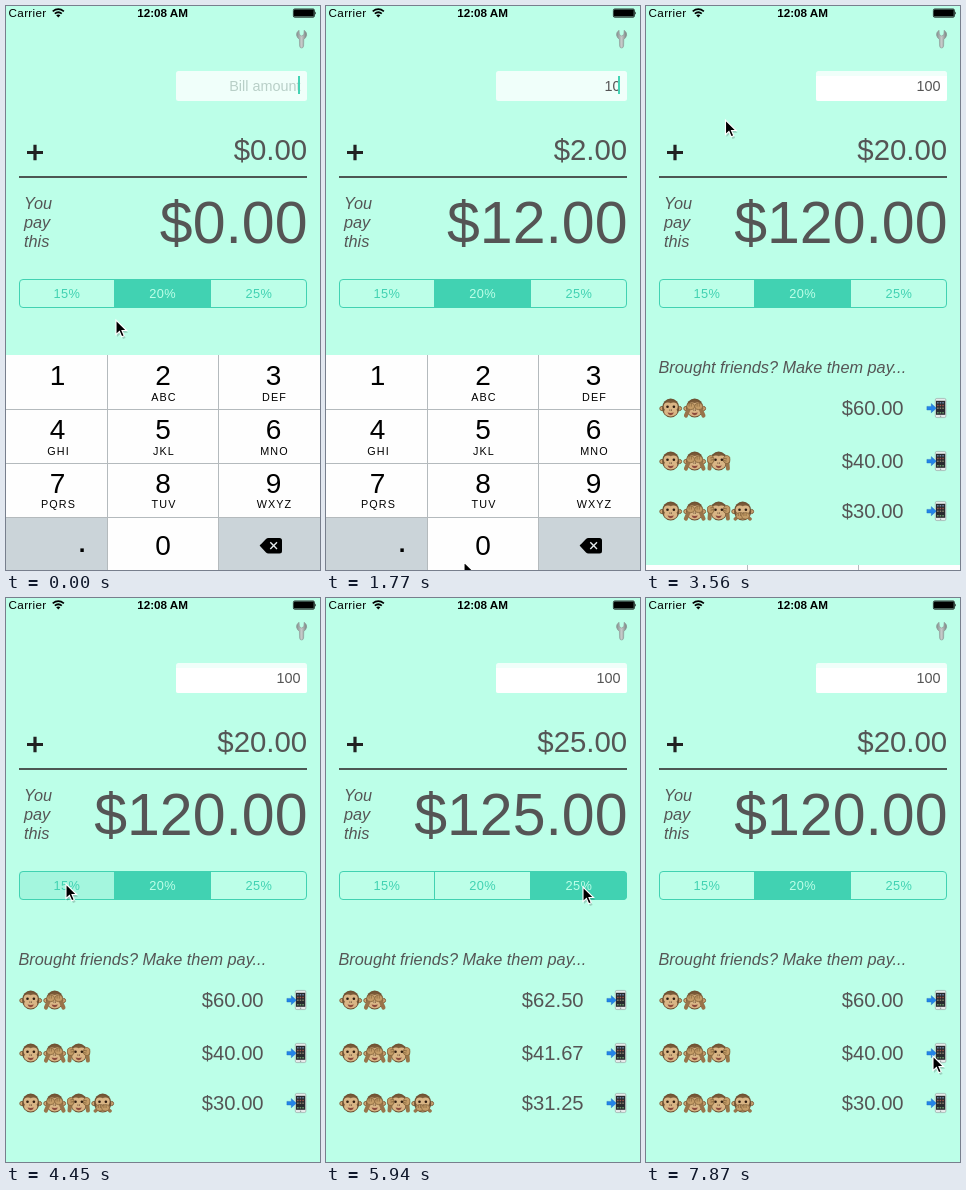
Animation, 314 px wide and 564 px high, one loop 8000 ms. Source, as an HTML page:

```html
<!DOCTYPE html>
<html lang="en">
<head>
<meta charset="utf-8">
<title>Tip calculator</title>
<style>
  html, body { margin: 0; width: 100%; height: 100%; overflow: hidden; background: #bcffe8; }
  svg { display: block; width: 314px; height: 564px; font-family: "Liberation Sans", Arial, sans-serif; }
  .grey { fill: #555; }
  .end { text-anchor: end; font-kerning: none; }
  .mid { text-anchor: middle; }
  .note { font-size: 16.3px; font-style: italic; fill: #555; }
</style>
</head>
<body>
<svg id="stage" viewBox="0 0 314 564">
  <defs>
    <linearGradient id="steel">
      <stop offset="0" stop-color="#84908e"/>
      <stop offset=".5" stop-color="#c6cac9"/>
      <stop offset="1" stop-color="#768280"/>
    </linearGradient>
    <radialGradient id="fur">
      <stop offset="0" stop-color="#a07b4e"/>
      <stop offset="1" stop-color="#6b4e30"/>
    </radialGradient>
    <g id="head">
      <g fill="#cfa673" stroke="#80623c" stroke-width="1">
        <circle cx="-8.8" cy=".5" r="2.1"/><circle cx="8.8" cy=".5" r="2.1"/>
      </g>
      <ellipse rx="8.6" ry="9.4" fill="url(#fur)"/>
      <g fill="#d9b585">
        <circle cx="-2.9" cy="-1.4" r="4.1"/><circle cx="2.9" cy="-1.4" r="4.1"/>
        <ellipse cy="3.8" rx="6.6" ry="4.7"/>
      </g>
      <g fill="#2e1c10">
        <circle cx="-3.2" cy="-1.2" r="1.3"/><circle cx="3.2" cy="-1.2" r="1.3"/>
        <circle cx="-.8" cy="2" r=".5"/><circle cx=".8" cy="2" r=".5"/>
      </g>
      <path d="M-3.2 4.6Q0 5.4 3.2 4.6Q2.3 7.2 0 7.2Q-2.3 7.2-3.2 4.6z" fill="#8c4a3c"/>
    </g>
    <g id="hand" stroke="#80603a" stroke-width=".7">
      <ellipse rx="4" ry="3.3" fill="#c39c67"/>
      <path d="M-1.6-2.7V.2M.6-3V.2" fill="none"/>
    </g>
    <g id="monkey0"><use href="#head"/></g>
    <g id="monkey1">
      <use href="#head"/>
      <path d="M-8.8 7.6L-6 1M8.8 7.6L6 1" stroke="#98744a" stroke-width="4" stroke-linecap="round"/>
      <use href="#hand" x="-4" y="-1.6"/><use href="#hand" x="4" y="-1.6"/>
    </g>
    <g id="monkey2">
      <use href="#head"/>
      <path d="M-9.2 7.6L-8.6 0M9.2 7.6L8.6 0" stroke="#98744a" stroke-width="4" stroke-linecap="round"/>
      <use href="#hand" transform="translate(-8 -1.5) rotate(80)"/>
      <use href="#hand" transform="translate(8 -1.5) rotate(-80)"/>
    </g>
    <g id="monkey3">
      <use href="#head"/>
      <path d="M-7.4 8L-4 5M7.4 8L4 5" stroke="#98744a" stroke-width="3.4" stroke-linecap="round"/>
      <use href="#hand" x="-2.8" y="4.8"/><use href="#hand" x="2.8" y="4.8"/>
    </g>
    <g id="send">
      <rect x="-1.2" y="-9.6" width="10.6" height="19.2" rx="1.5" fill="#e6ebeb" stroke="#929d9d" stroke-width=".6"/>
      <rect x="-.5" y="-7.2" width="9.2" height="14" fill="#282a2e"/>
      <g stroke-width="1.5" stroke-dasharray="1.5 1.1">
        <path d="M.6-5.2H8" stroke="#6b82a5"/><path d="M.6-2.5H8" stroke="#a3574d"/>
        <path d="M.6.2H8" stroke="#85806b"/><path d="M.6 4.8H8" stroke="#6a9a6c"/>
      </g>
      <circle cx="4.1" cy="8.2" r=".7" fill="#929d9d"/>
      <path d="M-9.6-1.6H-5.2V-4.4L-.2.2L-5.2 4.8V2H-9.6z" fill="#2384e8" stroke="#1767bd" stroke-width=".4"/>
    </g>
    <clipPath id="pill"><rect x="13" y="273" width="288" height="29" rx="4"/></clipPath>
  </defs>

  <rect width="314" height="564" fill="#bcffe8"/>

  <text x="2.6" y="11.2" font-size="11.7" letter-spacing=".3">Carrier</text>
  <g fill="none" stroke="#000" stroke-width="1.7">
    <path d="M46.7 5.4Q52.3.9 57.9 5.4M48.8 7.7Q52.3 4.8 55.8 7.7"/>
  </g>
  <path d="M50.2 9.3Q52.3 7.6 54.4 9.3L52.3 11.6z"/>
  <text class="mid" x="156.6" y="11.2" font-size="11.7" font-weight="bold">12:08 AM</text>
  <rect x="287.4" y="3" width="21" height="8.2" rx="1.3" fill="none" stroke="#000" stroke-width=".8"/>
  <rect x="288" y="3.6" width="19.8" height="7" rx=".6"/>
  <path d="M309 5.5Q310.7 7.1 309 8.7z"/>

  <path d="M293 24.2Q290 26.4 290.6 29.6Q291.2 32 293.4 33.2L293.6 40Q293.8 42 295.6 42Q297.4 42 297.6 40L297.8 33.2Q300 32 300.6 29.6Q301.2 26.4 298.2 24.2L297.8 28.6L295.6 30L293.4 28.6z" fill="url(#steel)" stroke="#7f8b89" stroke-width=".5"/>

  <rect x="170" y="65" width="131" height="30" rx="2.5" fill="#fff" opacity=".78"/>
  <path id="field" d="M170 70H301V92.5Q301 95 298.5 95H172.5Q170 95 170 92.5z" fill="#fff"/>
  <text id="bill" class="end" x="294.4" y="84.5" font-size="14.4"></text>
  <rect id="caret" x="292" y="70" width="2" height="18" fill="#44d3b4"/>

  <path d="M21 146.5H37M29 138.7V154.3" stroke="#222" stroke-width="3.2"/>
  <text id="tip" class="grey end" x="301.2" y="154" font-size="29.4"></text>
  <rect x="13" y="170" width="288" height="2" fill="#4c5753"/>
  <g class="note"><text x="18" y="203">You</text><text x="18" y="222">pay</text><text x="18" y="241">this</text></g>
  <text id="total" class="grey end" x="301.5" y="237.3" font-size="59"></text>

  <g id="segs" font-size="12.8" letter-spacing=".5"></g>
  <path d="M108.5 273V302M204.5 273V302" stroke="#41d2b2"/>
  <rect x="13.5" y="273.5" width="287" height="28" rx="3.5" fill="none" stroke="#41d2b2"/>

  <text class="note" x="12.5" y="367">Brought friends? Make them pay...</text>
  <g id="friends"></g>
  <g id="keys"></g>

  <g id="cursor">
    <path d="M1 2V17L4.6 13.8L7 19L9.6 17.9L7.2 12.8H12z" fill="#000" opacity=".18"/>
    <path d="M0 0V14.6L3.4 11.5L5.7 16.8L8.3 15.7L6 10.5H10.6z" stroke="#fff" stroke-width="1.1"/>
  </g>
</svg>
<script>
const LOOP = 8000, STEP = 148.4;
const RATES = [15, 20, 25];
const TINT = '#41d2b2', MINT = '#bcffe8';
const $ = id => document.getElementById(id);

function add(parent, tag, attrs, text) {
  const el = document.createElementNS('http://www.w3.org/2000/svg', tag);
  for (const name in attrs) el.setAttribute(name, attrs[name]);
  if (text) el.textContent = text;
  return parent.appendChild(el);
}

// Segmented control
const edges = [13, 108.5, 204.5, 301];
const segs = RATES.map((rate, i) => {
  const x = edges[i], width = edges[i + 1] - x;
  return {
    box: add($('segs'), 'rect', { x, y: 273, width, height: 29, fill: TINT, 'clip-path': 'url(#pill)' }),
    label: add($('segs'), 'text', { class: 'mid', x: x + width / 2 + .2, y: 292 }, rate + '%')
  };
});

// Split rows
const shares = [402, 455, 505].map((y, row) => {
  for (let i = 0; i < row + 2; i++) add($('friends'), 'use', { href: '#monkey' + i, x: 24.7 + 24 * i, y });
  add($('friends'), 'use', { href: '#send', x: 290.5, y });
  return add($('friends'), 'text', { class: 'grey end', x: 257.6, y: y + 7, 'font-size': 20.2 });
});

// Number pad
const cols = [0, 101.5, 212.5, 314], rows = [349, 403.5, 457.5, 511.5, 564];
const centers = [51.5, 157, 267.5];
const letters = ['', 'ABC', 'DEF', 'GHI', 'JKL', 'MNO', 'PQRS', 'TUV', 'WXYZ'];
const WHITE = '#fefefe', GREY = '#cbd4d9';
const pad = $('keys'), keyBoxes = {};
for (let i = 0; i < 12; i++) {
  const c = i % 3, r = Math.floor(i / 3);
  const name = i < 9 ? i + 1 : ['dot', 0, 'del'][c];
  keyBoxes[name] = add(pad, 'rect', {
    x: cols[c], y: rows[r], width: cols[c + 1] - cols[c], height: rows[r + 1] - rows[r],
    fill: typeof name === 'number' ? WHITE : GREY
  });
  if (typeof name === 'number')
    add(pad, 'text', { class: 'mid', x: centers[c], y: r < 3 ? 379 + 54 * r : 549, 'font-size': 28 }, String(name));
  if (letters[i])
    add(pad, 'text', { class: 'mid', x: centers[c] + 1, y: 395 + 53.7 * r, 'font-size': 10.8, 'letter-spacing': 1.1 }, letters[i]);
}
add(pad, 'path', { d: 'M101.5 349V564M212.5 349V564M0 403.5H314M0 457.5H314M0 511.5H314', stroke: '#b4babd', 'stroke-width': 1 });
add(pad, 'text', { class: 'mid', x: 76, y: 546, 'font-size': 24, 'font-weight': 'bold' }, '.');
add(pad, 'path', { d: 'M253.6 539.6L260 533Q261 532 262.4 532H273.5Q276 532 276 534.5V545Q276 547.5 273.5 547.5H262.4Q261 547.5 260 546.4z' });
add(pad, 'path', { d: 'M264.3 536.2L271 543M271 536.2L264.3 543', stroke: '#e4e9ec', 'stroke-width': 1.4 });

// Pointer path: tick, x, y
const path = [
  [0, 110, 314], [1, 107, 319], [4, 55, 371], [6, 54, 374], [7, 84, 442], [8, 130, 529], [10, 138, 556],
  [17, 138, 556], [18, 96, 270], [19, 79.5, 114], [24, 79.5, 114], [25, 78, 132], [28, 63, 272],
  [30, 60, 286], [32, 64, 287], [34, 157, 287], [36, 254, 288], [38, 259, 289], [41, 256, 289],
  [44, 192, 290], [46, 171.5, 290], [48, 178, 296], [51, 278, 438], [52, 286, 455], [53, 287, 458]
];

function pointer(k) {
  let i = 0;
  while (i < path.length - 2 && path[i + 1][0] <= k) i++;
  const [k0, x0, y0] = path[i], [k1, x1, y1] = path[i + 1];
  const p = Math.min(1, (k - k0) / (k1 - k0));
  return [x0 + (x1 - x0) * p, y0 + (y1 - y0) * p];
}

const money = v => '$' + v.toFixed(2);
const choice = k => k < 31 ? 1 : k < 38 ? 0 : k < 46 ? 2 : 1;

function draw(ms) {
  // The picture advances in even ticks
  const k = Math.min(53, Math.floor((ms + 14) / STEP));
  const editing = k < 23;

  const bill = k < 6 ? 0 : k < 12 ? 1 : k < 15 ? 10 : 100;
  const sel = choice(k), last = choice(k - 1), next = choice(k + 1);
  const tip = bill * RATES[sel] / 100, total = bill + tip;

  $('bill').textContent = bill || 'Bill amount';
  $('bill').setAttribute('fill', bill ? '#555' : '#b8cfc7');
  $('field').setAttribute('opacity', editing ? 0 : 1);
  const blink = k === 3 || k === 4 || k === 19 || k === 20 ? 0 : k === 18 || k === 21 ? .5 : 1;
  $('caret').setAttribute('opacity', editing ? blink : 0);
  $('tip').textContent = money(tip);
  $('total').textContent = money(total);
  shares.forEach((el, i) => el.textContent = money(total / (i + 2)));

  // A segment is tinted while pressed and fades after it is left
  segs.forEach(({ box, label }, i) => {
    const on = i === sel;
    box.setAttribute('opacity', on ? (i === last ? 1 : .95) : i === next ? .2 : i === last ? .12 : 0);
    label.setAttribute('fill', on ? MINT : TINT);
  });

  keyBoxes[1].setAttribute('fill', k === 5 ? GREY : WHITE);
  keyBoxes[0].setAttribute('fill', k === 11 || k === 14 ? GREY : WHITE);
  const slide = 1 - Math.pow(1 - Math.min(1, Math.max(0, (k - 22) / 2.5)), 2.3);
  pad.setAttribute('transform', `translate(0 ${Math.round(215 * slide)})`);

  $('cursor').setAttribute('transform', `translate(${pointer(k)})`);
}

const start = performance.now();
function loop() {
  draw((performance.now() - start) % LOOP);
  requestAnimationFrame(loop);
}
draw(0);
requestAnimationFrame(loop);
</script>
</body>
</html>
```
